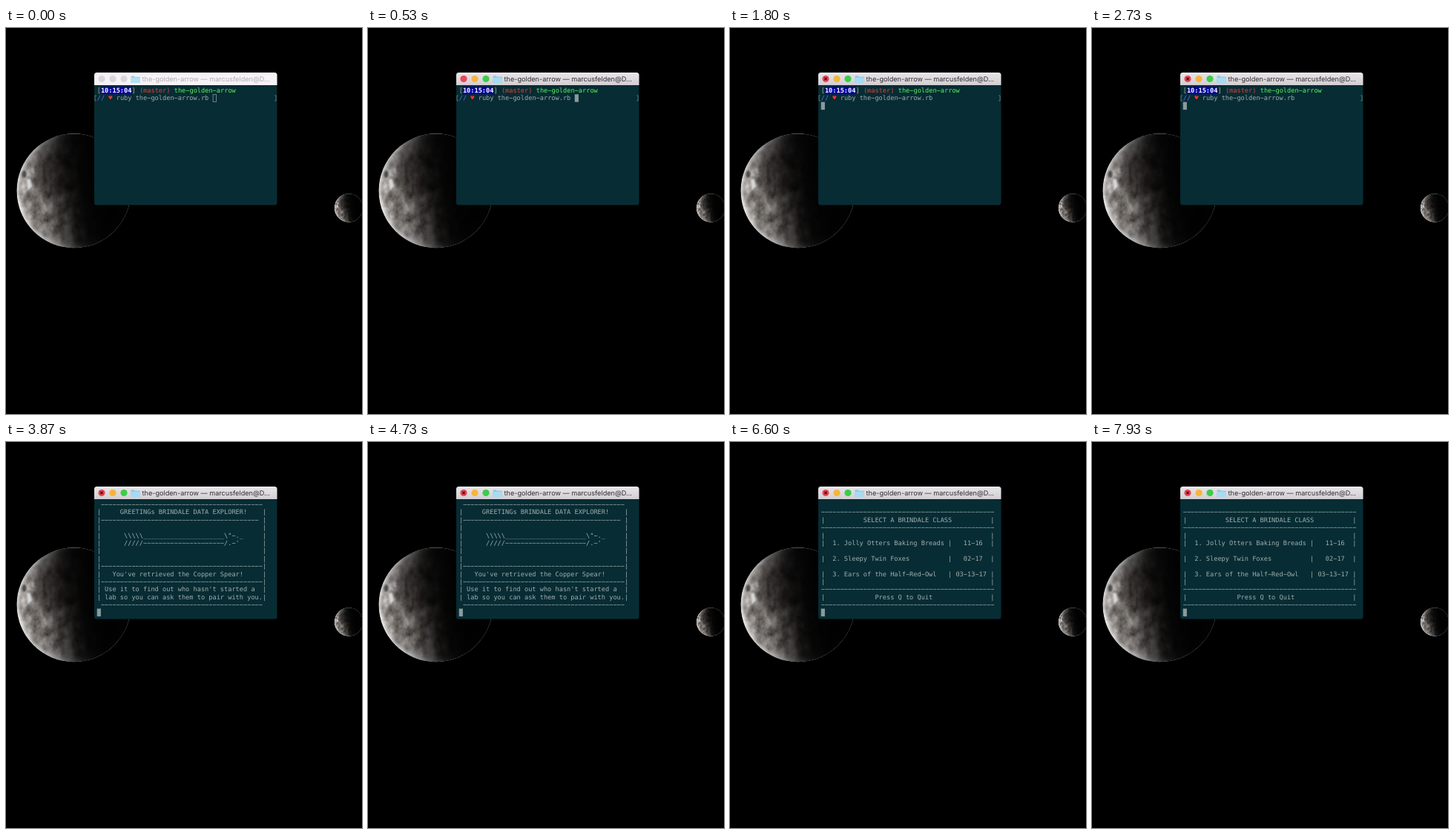
Write an HTML page that moves like this. It is 480x520 px and loops after 8000 ms.

```html
<!DOCTYPE html>
<html lang="en">
<head>
<meta charset="utf-8">
<title>Terminal session</title>
<style>
  html, body { margin: 0; width: 100%; height: 100%; overflow: hidden; background: #000; }
  svg { position: absolute; left: 0; top: 0; display: block; }
  text { white-space: pre; text-rendering: geometricPrecision; }
  .term text { font: 8.638px "DejaVu Sans Mono", monospace; fill: #a1aeac; }
  .term .title { font: 9.15px Inter, sans-serif; }
  .hide { display: none; }
</style>
</head>
<body>
<svg width="480" height="520" viewBox="0 0 480 520">
  <defs>
    <clipPath id="disc"><circle r="77"/></clipPath>
    <filter id="rock" x="0" y="0" width="1" height="1" color-interpolation-filters="sRGB">
      <feTurbulence type="fractalNoise" baseFrequency=".085 .065" numOctaves="5" seed="4"/>
      <feColorMatrix values=".8 0 0 0 .15  .8 0 0 0 .125  .8 0 0 0 .105  0 0 0 0 1"/>
    </filter>
    <filter id="soft"><feGaussianBlur stdDeviation=".9"/></filter>
    <filter id="blur" x="-.5" y="-.5" width="2" height="2"><feGaussianBlur stdDeviation="4"/></filter>
    <linearGradient id="shade" gradientUnits="userSpaceOnUse" x1="-77" y1="10" x2="32" y2="-10">
      <stop offset="0" stop-opacity="0"/>
      <stop offset=".3" stop-opacity=".26"/>
      <stop offset=".5" stop-opacity=".6"/>
      <stop offset=".66" stop-opacity=".86"/>
      <stop offset=".8" stop-opacity=".96"/>
      <stop offset="1" stop-opacity=".99"/>
    </linearGradient>
    <radialGradient id="limb" gradientUnits="userSpaceOnUse" r="77" cx="0" cy="0">
      <stop offset=".7" stop-color="#fff" stop-opacity="0"/>
      <stop offset=".93" stop-color="#fff" stop-opacity=".3"/>
      <stop offset="1" stop-color="#fff" stop-opacity=".85"/>
    </radialGradient>
    <linearGradient id="bar" x1="0" y1="0" x2="0" y2="1">
      <stop offset="0" stop-color="#e9e6e9"/>
      <stop offset="1" stop-color="#d2ced2"/>
    </linearGradient>
    <g id="moon" clip-path="url(#disc)">
      <rect x="-77" y="-77" width="154" height="154" filter="url(#rock)"/>
      <path d="M-56-48l44-14 10 60-24 12-26-20z" fill="#15110e" opacity=".38" filter="url(#blur)"/>
      <circle r="77" fill="url(#limb)"/>
      <g filter="url(#soft)">
        <path d="M-64-16l5 0 3 10-6 6z" fill="#fff"/>
        <path d="M-57-31l3 1 1 7-4-2z" fill="#fff" opacity=".6"/>
        <ellipse cx="-67" cy="-22" rx="3" ry="5" fill="#111" opacity=".6"/>
        <path d="M-40-28v22m9-20v26" stroke="#0d0a08" stroke-width="1.5" opacity=".4"/>
      </g>
      <rect x="-77" y="-77" width="154" height="154" fill="url(#shade)"/>
    </g>
  </defs>
  <rect width="480" height="520"/>
  <use href="#moon" transform="translate(91.5 219.3)"/>
  <use href="#moon" transform="translate(462 242.4) scale(.25)"/>
</svg>

<svg class="term" width="480" height="520" viewBox="0 0 480 520">
  <rect x="119" y="60" width="246.5" height="178.5" rx="3" fill="#072c34"/>
  <path id="head" d="M119 77V63.5a3.5 3.5 0 0 1 3.5-3.5h239.5a3.5 3.5 0 0 1 3.5 3.5V77z"/>
  <g id="lights"></g>
  <path id="cross" d="M127.3 66.8l3.4 3.4m0-3.4l-3.4 3.4" stroke="#5c0404" stroke-width="1.3"/>
  <g id="folder">
    <path d="M168.5 65.4q0-.9.9-.9h3.2l1.2 1.3h6.4q.8 0 .8.8V73q0 1-1 1h-10.5q-1 0-1-1z" fill="#84c9e8"/>
    <rect x="168.5" y="66.7" width="12.5" height="7.3" rx=".9" fill="#a5dbf3"/>
  </g>
  <g id="name"></g>
  <g id="prompt"></g>
  <g id="hello"></g>
  <g id="menu"></g>
  <rect id="cursor" width="5.2" height="10.4"/>
</svg>

<script>
const LOOP = 8000, X0 = 122.7, Y0 = 78.9, CELL = 5.2, ROW = 10.4;
const $ = id => document.getElementById(id);

function add(parent, tag, attrs, content = '') {
  const el = document.createElementNS('http://www.w3.org/2000/svg', tag);
  for (const key in attrs) el.setAttribute(key, attrs[key]);
  el.textContent = content;
  parent.append(el);
  return el;
}

// The terminal face has hyphens as wide as a minus sign.
function print(parent, row, col, str, style = '') {
  add(parent, 'text', { x: X0 + col * CELL, y: Y0 + 8.1 + row * ROW, style },
      str.replace(/-/g, '\u2212'));
}

const lights = [129, 144, 159].map(cx => add($('lights'), 'circle', { cx, cy: 68.5, r: 4.6 }));
const title = add($('name'), 'text', { x: 183.5, y: 72.3, class: 'title' },
  'the-golden-arrow \u2014 marcusfelden@D\u2026');

// Shell prompt
const prompt = $('prompt');
add(prompt, 'rect', { x: X0 + CELL, y: Y0 + .2, width: 8 * CELL, height: ROW - .2, fill: '#0404a0' });
print(prompt, 0, 0, '[');
print(prompt, 0, 1, '10:15:04', 'fill:#fff;font-weight:bold');
print(prompt, 0, 9, ']');
print(prompt, 0, 11, '(master)', 'fill:#dc453c');
print(prompt, 0, 20, 'the-golden-arrow', 'fill:#5cf75c');
print(prompt, 1, 0, '//', 'fill:#5a70ee');
print(prompt, 1, 3, '\u2665', 'fill:#e23a2c');
print(prompt, 1, 5, 'ruby the-golden-arrow.rb');
add(prompt, 'path', {
  d: 'M121.8 91h-1.8v7h1.8M362.3 91h1.8v7h-1.8',
  fill: 'none', stroke: '#71868a', 'stroke-width': .8
});

// Boxed screens: pad a line out to the right border
const box = (width, str = '') => '|' + str.padEnd(width) + '|';
const dash = n => '-'.repeat(n);
const show = (id, lines) => lines.forEach((line, row) => line && print($(id), row, 0, line));

const frame = str => box(42, str), split = frame(dash(42));
show('hello', [
  ' ' + dash(42),
  frame('     GREETINGs BRINDALE DATA EXPLORER!'),
  frame(dash(41)),
  frame(),
  frame('      ' + '\\'.repeat(5) + '_'.repeat(21) + '\\"-._'),
  frame('      ' + '/'.repeat(5) + '~'.repeat(21) + "/.-'"),
  frame(),
  frame(),
  split,
  frame("   You've retrieved the Copper Spear!"),
  split,
  frame(" Use it to find out who hasn't started a"),
  frame(' lab so you can ask them to pair with you.'),
  ' ' + dash(42)
]);

const wide = str => box(43, str), rule = dash(45);
const entry = (label, date) => wide(('  ' + label).padEnd(32) + '|' + date);
show('menu', [
  '',
  rule,
  wide('          SELECT A BRINDALE CLASS'),
  rule,
  wide(),
  entry('1. Jolly Otters Baking Breads', '   11-16'),
  '',
  entry('2. Sleepy Twin Foxes', '   02-17'),
  '',
  entry('3. Ears of the Half-Red-Owl', ' 03-13-17'),
  wide(),
  rule,
  wide('             Press Q to Quit'),
  rule
]);

// Each step: start time, visible screen, cursor column and row
const steps = [
  { at: 0, screen: 'prompt', col: 30, row: 1, idle: true },
  { at: 70, screen: 'prompt', col: 30, row: 1 },
  { at: 1270, screen: 'prompt', col: 0, row: 2, hover: true },
  { at: 2800, screen: 'hello', col: 0, row: 14, hover: true },
  { at: 5800, screen: 'menu', col: 0, row: 14, hover: true }
];

function apply({ screen, col, row, idle, hover }) {
  for (const id of ['prompt', 'hello', 'menu']) $(id).classList.toggle('hide', id !== screen);
  $('cross').classList.toggle('hide', !hover);
  $('head').setAttribute('fill', idle ? '#f6f3f6' : 'url(#bar)');
  $('folder').style.opacity = idle ? .8 : 1;
  title.style.fill = idle ? '#b0adb0' : '#302e30';
  const colors = idle ? ['#d9d6d9', '#d9d6d9', '#d9d6d9'] : ['#e8485a', '#f5b53c', '#3ecb4c'];
  lights.forEach((dot, i) => dot.setAttribute('fill', colors[i]));
  const inset = idle ? .4 : 0, cursor = $('cursor');
  cursor.setAttribute('x', X0 + col * CELL + inset);
  cursor.setAttribute('y', Y0 + row * ROW + inset);
  cursor.setAttribute('width', CELL - 2 * inset);
  cursor.setAttribute('height', ROW - 2 * inset);
  cursor.setAttribute('fill', idle ? 'none' : '#8b9b9c');
  cursor.setAttribute('stroke', idle ? '#8b9b9c' : 'none');
  cursor.setAttribute('stroke-width', .8);
}

const start = performance.now();
let current;
function tick() {
  const t = (performance.now() - start) % LOOP;
  const step = steps.findLast(s => s.at <= t);
  if (step !== current) apply(current = step);
  requestAnimationFrame(tick);
}
tick();
</script>
</body>
</html>
```
